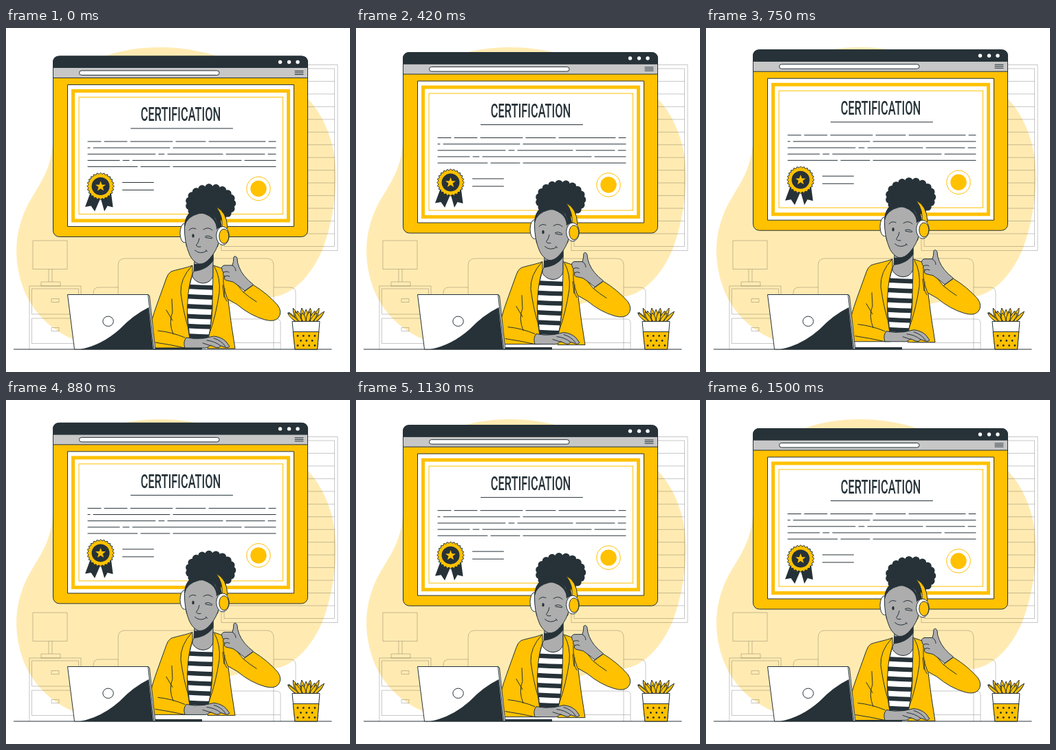
An HTML page that plays this animation: 500x500 px, repeating every 1540 ms.

```html
<!DOCTYPE html>
<html lang="en">
<head>
<meta charset="utf-8">
<title>Certification</title>
<style>
html, body { margin: 0; width: 100%; height: 100%; overflow: hidden; background: #fff; }
svg { display: block; width: 100vw; height: 100vh; }
.line { fill: none; stroke: #263238; stroke-width: 1; stroke-linecap: round; stroke-linejoin: round; }
.ink { fill: #263238; }
.sun { fill: #ffc100; }
.white { fill: #fff; }
.skin { fill: #adadad; }
.edge { stroke: #263238; stroke-width: 1; stroke-linejoin: round; }
.room { fill: none; stroke: #000; stroke-opacity: .22; stroke-width: 1; }
.title { font: 500 26.7px Roboto, Arial, sans-serif; text-anchor: middle; fill: #263238; }
</style>
</head>
<body>
<svg viewBox="0 0 500 500">
  <path fill="#ffebb2" d="M225 28C165 28 112 45 86 84C68 112 72 145 67 178C60 222 38 238 25 272C14 300 12 330 20 362C30 402 55 431 90 449C150 474 212 456 262 428C310 402 345 394 388 391C424 386 448 350 460 322C470 296 478 262 480 220C480 170 464 130 439 103C420 84 385 71 352 58C312 40 270 28 225 28Z"/>

  <g class="room">
    <path id="blinds"/>
    <path d="M39 309H89V350.500H39ZM62 350.500V369M67 350.500V369M51 369H79V375H51Z"/>
    <path d="M34 467V375H109V467M37.500 379H105.500V416H37.500ZM37.500 422H105.500V458.500H37.500ZM66 393.500H77V398.500H66ZM66 435.500H77V440.500H66Z"/>
    <path d="M163 467V345Q163 335 173 335H379Q389 335 389 345V467"/>
    <path d="M127 467V385Q127 377 135 377H163M389 377H413Q421 377 421 385V467"/>
    <path d="M300 423H393Q399 423 399 429V467M300 457.500H399"/>
  </g>

  <g class="float">
    <rect class="sun edge" x="68.500" y="41" width="370" height="262.500" rx="9"/>
    <path fill="#c7c7c7" class="edge" d="M68.500 57.500H438.500V72.500H68.500Z"/>
    <path class="ink edge" d="M68.500 57.500V50Q68.500 41 77.500 41H429.500Q438.500 41 438.500 50V57.500Z"/>
    <g class="white">
      <circle cx="398.500" cy="49.500" r="2.700"/>
      <circle cx="411.500" cy="49.500" r="2.700"/>
      <circle cx="424" cy="49.500" r="2.700"/>
    </g>
    <rect class="white edge" x="106.500" y="62" width="203.500" height="6.500" rx="3.200"/>
    <path class="line" d="M420 62.500H432M420 65H432M420 67.500H432"/>
    <rect class="white edge" x="89.500" y="82.500" width="329" height="206"/>
    <rect fill="none" stroke="#ffc100" stroke-width="5" x="97.500" y="91.500" width="313" height="188.500"/>
    <rect fill="none" stroke="#ffc100" x="106" y="100.500" width="296.500" height="170"/>
    <text class="title" transform="translate(254 135.300) scale(.615 1)">CERTIFICATION</text>
    <path class="line" d="M181.500 146H329.500M169.500 224.500H214.500M169.500 235.500H214.500"/>
    <path class="line" id="copy" stroke-linecap="butt"/>
    <path class="ink" d="M122 241L115 260L123.500 258.500L129 266.500L137.500 247L143 266.500L147.500 258.500L155.500 260.500L153 241Z"/>
    <path class="sun edge" id="badge"/>
    <circle class="ink" cx="137.500" cy="230" r="13"/>
    <path class="sun" id="star"/>
    <circle cx="367" cy="233.500" r="17.200" fill="#fff" stroke="#ffc100"/>
    <circle class="sun" cx="367" cy="233.500" r="11.700"/>
  </g>

  <path class="line" d="M11.500 467H473"/>
  <path class="ink" d="M214 464H285V467.500H214Z"/>

  <g class="float">
    <g class="ink" id="hair"></g>
    <ellipse class="white edge" cx="259.500" cy="298" rx="6.500" ry="14"/>
    <path class="ink" d="M259 292Q258 266 282 261Q312 258 314 292L308 318H262Z"/>

    <path class="white edge" d="M271 357L262 395L267 453H296L303 357Z"/>
    <clipPath id="shirt"><path d="M271 357L262 395L267 453H296L303 357Z"/></clipPath>
    <path clip-path="url(#shirt)" id="stripes" fill="none" stroke="#263238" stroke-width="6.500"/>
    <path class="skin edge" d="M274 338L273 354Q270 357 271 362Q277 371 287 371Q298 370 301 360L301 322Z"/>
    <path class="ink" d="M273.500 343Q289 344 301.500 327V338Q292 352 273 354Z"/>
    <path class="skin edge" d="M259.500 289Q262 274 281 269.500Q298 267 305 277Q311 290 310 309Q306 324 297 334Q289 344 280 343Q272 340 267 330Q259 312 259.500 289Z"/>
    <path class="ink" d="M284 269Q303 264 309 290L306 293Q306 275 284 269Z"/>
    <path class="line" d="M266 294Q270 289 276 292M287 293Q294 288 300 294M289.500 303Q295 300.500 300 305M290 304.500L299 306M281 306Q280 312 276.500 316Q278 319 283 318M274.500 323Q282 330 291.500 324M290.500 322.500L292.500 325"/>
    <ellipse class="ink" cx="272" cy="302" rx="1.700" ry="2.700"/>
    <path class="sun edge" d="M305.500 260Q321 267 322 291L314 291Q316 274 305.500 260Z"/>
    <ellipse class="white edge" cx="315" cy="302" rx="9.300" ry="13.500"/>
    <ellipse class="sun edge" cx="316.800" cy="302.700" rx="7" ry="10.500"/>

    <path class="sun edge" d="M271 345C262 349 248 351 240 354Q235 357 233 364L219 403Q211 425 208 442L212 465H268L267 452Q262 425 264 398Q265 375 271 357Z"/>
    <path class="sun edge" d="M301 345Q311 348 320 352L334 380L323 396Q327 430 333 466H293L294 452Q301 420 300 395L301 357Z"/>
    <path class="sun edge" d="M318 351Q330 366 345 384L359.500 373.500Q380 386 395 403Q402 413 396 421Q390 428 376 424Q355 418 336 402L322 394Q312 370 318 351Z"/>
    <path class="line" d="M270 346Q253 364 254 385Q258 415 266 440M303 347Q312 363 310 385Q305 419 295 446M345 384Q353 391 364 398M318 379Q315 389 321 397M315 374L317 391M241 394L242 413Q236 428 243 445M233 410L242 425M221 440Q241 442 260 450"/>
    <path class="skin edge" d="M347 382L359.500 373Q344 361 339 348Q336 341 336 335Q334 330 331 333Q331 340 329 345L317 345Q312 347 314 351Q314 354 316 355Q314 359 318 361Q316 366 321 367L330 369Q339 375 347 382Z"/>
    <path class="line" d="M316 355Q321 353 324 355M318 361Q322 359 325 361M329 345Q334 348 334 353"/>
    <path class="skin edge" d="M262 450Q274 453 288 451L302 448Q313 449 320 456L325 463Q322 466 318 464L312 462Q310 466 304 464L297 461Q293 466 286 465H260Q257 456 262 450Z"/>
    <path class="line" d="M292 454Q303 455 312 462M302 451Q313 454 319 463M286 458L298 462"/>
    <path class="line" d="M217 457Q238 460 260 465"/>
  </g>

  <path class="white edge" d="M89.500 387.500H206.500L208.500 389L217 467H99.500Z"/>
  <path class="ink" d="M108 467Q139 461 165 438Q185 417 207.500 406L214 467Z"/>
  <path class="line" d="M206.500 387.500L215 467"/>
  <ellipse class="white edge" cx="148.500" cy="426.300" rx="7.700" ry="7.200"/>

  <g id="leaves" class="sun edge"></g>
  <path class="white edge" d="M416 426.500H456L452.500 467H420Z"/>
  <path class="sun edge" d="M417.200 441.500H454.800L452.500 467H420Z"/>
  <g id="dots" class="ink"></g>
</svg>
<script>
const $ = id => document.getElementById(id);
const draw = (id, d) => $(id).setAttribute('d', d);
const range = (n, f) => Array.from({ length: n }, (_, i) => f(i));

// Closed polygon whose radius alternates between two values.
const spikes = (x, y, n, outer, inner) => 'M' + range(n * 2, i => {
  const a = i * Math.PI / n - Math.PI / 2, r = i % 2 ? inner : outer;
  return (x + r * Math.cos(a)).toFixed(2) + ' ' + (y + r * Math.sin(a)).toFixed(2);
}).join('L') + 'Z';

draw('badge', spikes(137.5, 230, 24, 19.8, 17.6));
draw('star', spikes(137.5, 230.3, 5, 7.8, 3.2));
draw('blinds', 'M313 53.500H482V323.500H313Z M317 59H477.500V317.500H317Z' +
  range(13, i => `M317 ${59 + (i + 1) * 18.46}H477.500`).join(''));
draw('stripes', range(6, i => `M258 ${375.5 + i * 14.3}Q280 ${377 + i * 14.3} 306 ${377.5 + i * 14.3}`).join(''));

// Each row runs from 119 to 392 with 5px gaps at these places.
const gaps = [[138, 176, 242, 290, 377], [122, 238], [217, 230, 315, 376], [165, 179, 342], [191, 238]];
draw('copy', gaps.map((row, i) => {
  const y = 165 + i * 9.15;
  return `M119 ${y}` + row.map(x => `H${x}M${x + 5} ${y}`).join('') + 'H392';
}).join(''));

$('hair').innerHTML = '<ellipse cx="297.500" cy="255" rx="33" ry="25"/>' + range(19, i => {
  const a = i * Math.PI * 2 / 19;
  return `<circle cx="${297.5 + 31 * Math.cos(a)}" cy="${255 + 23 * Math.sin(a)}" r="5.700"/>`;
}).join('');

const leaf = (tipX, tipY, x) => {
  const mx = (tipX + x) / 2, my = (tipY + 427) / 2;
  return `<path d="M${x - 1} 427Q${mx - 5} ${my} ${tipX} ${tipY}Q${mx + 5} ${my} ${x + 2} 427Z"/>`;
};
$('leaves').innerHTML = range(9, i => leaf(411 + i * 6.3, i % 2 ? 407 : 409 + Math.abs(i - 4), 422 + i * 3.4)).join('') +
  range(6, i => leaf(409.5 + i * 10.6, 414 - (i % 2) * 2, 423 + i * 5)).join('');

$('dots').innerHTML = range(3, r => range(r % 2 ? 3 : 4, c =>
  `<circle cx="${(r % 2 ? 428.5 : 424) + c * 8.3}" cy="${447.5 + r * 7}" r="1.400"/>`).join('')).join('');

const LOOP = 1540, HALF = LOOP / 2, RISE = 10;
const floats = document.querySelectorAll('.float');

// Linear rise and fall, advanced at 24 steps per second.
function pose(ms) {
  const t = Math.floor((ms % LOOP + 5) * .024) / .024;
  const p = ((t + 40) % LOOP) / HALF;
  const y = .5 - RISE * (p < 1 ? p : 2 - p);
  floats.forEach(g => g.setAttribute('transform', `translate(0 ${y.toFixed(2)})`));
}

const start = performance.now();
function tick() {
  pose(performance.now() - start);
  requestAnimationFrame(tick);
}
tick();
</script>
</body>
</html>
```
